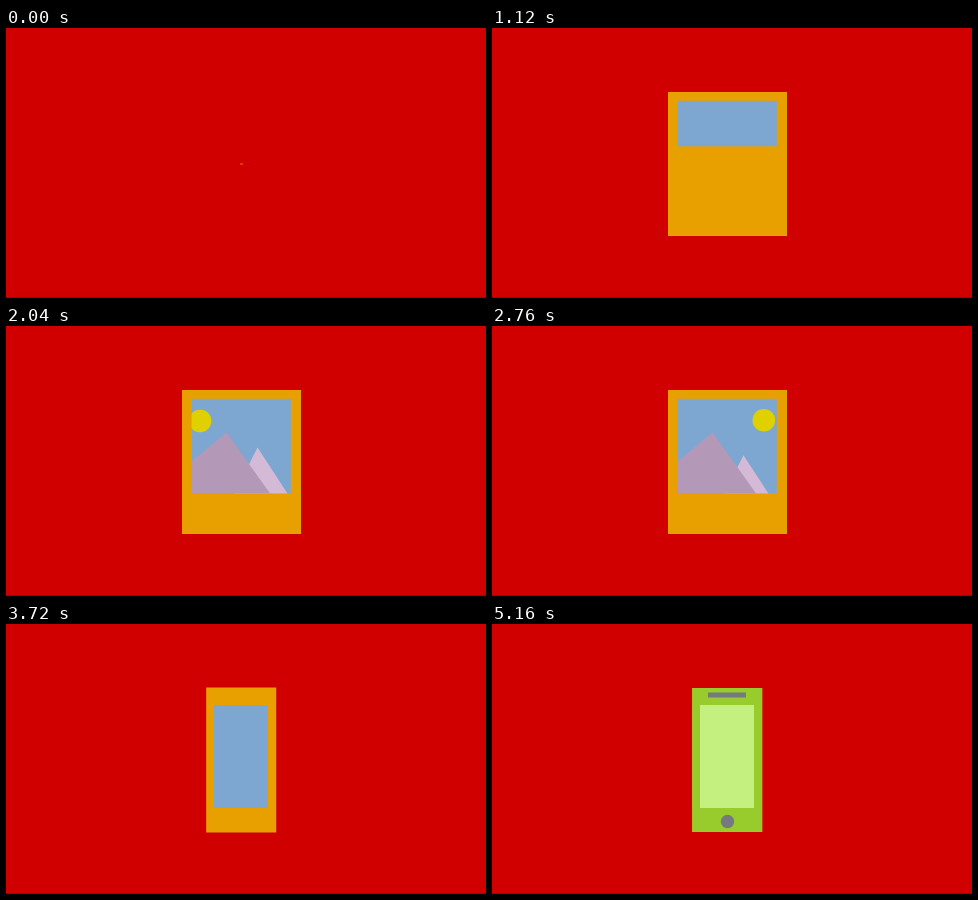
An HTML page with a canvas for the animation above (6760 ms loop, 480x270 px).

```html
<!DOCTYPE html>
<html lang="en">
<head>
<meta charset="utf-8">
<title>Shape morph</title>
<style>
  html, body { margin: 0; width: 100%; height: 100%; overflow: hidden; background: #d00000; }
  canvas { display: block; width: 100vw; height: 100vh; }
</style>
</head>
<body>
<canvas id="stage" width="480" height="270"></canvas>
<script>
const LOOP = 6760;
const ctx = document.getElementById('stage').getContext('2d');
const color = {
  back: '#d00000', edge: '#a80000', card: '#e8a000', sky: '#7da7d1', sun: '#e0d000',
  near: '#b398b7', far: '#d4bad6', phone: '#98cc2c', screen: '#c4f07f', detail: '#757a80'
};

const mix = (a, b, p) => a + (b - a) * p;
const span = (t, from, to) => Math.min(1, Math.max(0, (t - from) / (to - from)));
const easeOut = p => 1 - (1 - p) ** 2;
const easeInOut = p => p < 0.5 ? 2 * p * p : 1 - 2 * (1 - p) ** 2;
const ease = (t, from, to) => easeInOut(span(t, from, to));

function rect(x, y, w, h, fill) {
  ctx.fillStyle = fill;
  ctx.fillRect(x, y, w, h);
}

function centered(cx, cy, w, h, fill) {
  rect(cx - w / 2, cy - h / 2, w, h, fill);
}

function disc(x, y, r, fill) {
  ctx.fillStyle = fill;
  ctx.beginPath();
  ctx.arc(x, y, r, 0, 2 * Math.PI);
  ctx.fill();
}

function peak(left, apexX, apexY, right, drop, fill) {
  ctx.fillStyle = fill;
  ctx.beginPath();
  ctx.moveTo(left, 168 + drop);
  ctx.lineTo(apexX, apexY + drop);
  ctx.lineTo(right, 168 + drop);
  ctx.fill();
}

function clipped(x, y, w, h, draw) {
  ctx.save();
  ctx.beginPath();
  ctx.rect(x, y, w, h);
  ctx.clip();
  draw();
  ctx.restore();
}

function scenery(t) {
  const nearUp = easeOut(span(t, 1400, 1880)) - ease(t, 2760, 3200);
  const farUp = easeOut(span(t, 1560, 2040)) - ease(t, 2640, 3060);
  const sunX = 235 + (t - 2420) * 0.108;
  const sunY = 91.2 + 0.0023 * (sunX - 235) ** 2;
  disc(sunX, sunY, 11.3, color.sun);
  peak(228, 251.5, 121.5, 281.8, 47 * (1 - farUp), color.far);
  peak(146.5, 220.5, 106.5, 264.5, 62 * (1 - nearUp), color.near);
}

function phone(t, body) {
  const wipe = ease(t, 3760, 4300);
  if (wipe > 0) {
    clipped(0, body.top, 480, body.h * wipe, () => {
      centered(body.cx, 136, body.w, body.h, color.phone);
      rect(208, 81, 54, 103, color.screen);
    });
  }
  disc(235.5, 197.5, 6.7 * easeOut(span(t, 4300, 4680)), color.detail);
  centered(235, 71, 38 * easeOut(span(t, 4680, 5160)), 5, color.detail);
}

function draw(t) {
  rect(0, 0, 480, 270, color.back);
  rect(0, 269, 480, 1, color.edge);

  // A thin line grows, widens into a card, then narrows into a phone.
  const grow = easeOut(span(t, 0, 400));
  const widen = ease(t, 400, 1040);
  const narrow = ease(t, 3320, 3720);
  const stretch = narrow - ease(t, 4200, 4640);
  const h = mix(150 * grow, 144, widen) + stretch;
  const body = {
    cx: mix(235.5, 235.2, narrow),
    w: mix(mix(3, 119, widen), 70, narrow),
    h, top: 136 - h / 2
  };
  centered(body.cx, 136, body.w, h, color.card);

  const open = ease(t, 930, 1320);
  const shift = easeOut(span(t, 3320, 3720));
  const x = mix(185.5, 208, shift), right = mix(284.8, 262, shift);
  const y = mix(72.8, 81, shift), bottom = mix(167.6, 184, shift);
  rect(x, y, right - x, (bottom - y) * open, color.sky);

  if (t > 1400 && t < 3240) clipped(x, y, right - x, bottom - y, () => scenery(t));
  if (t > 3720) phone(t, body);
}

const start = performance.now();
function frame() {
  draw((performance.now() - start) % LOOP);
  requestAnimationFrame(frame);
}
frame();
</script>
</body>
</html>
```
